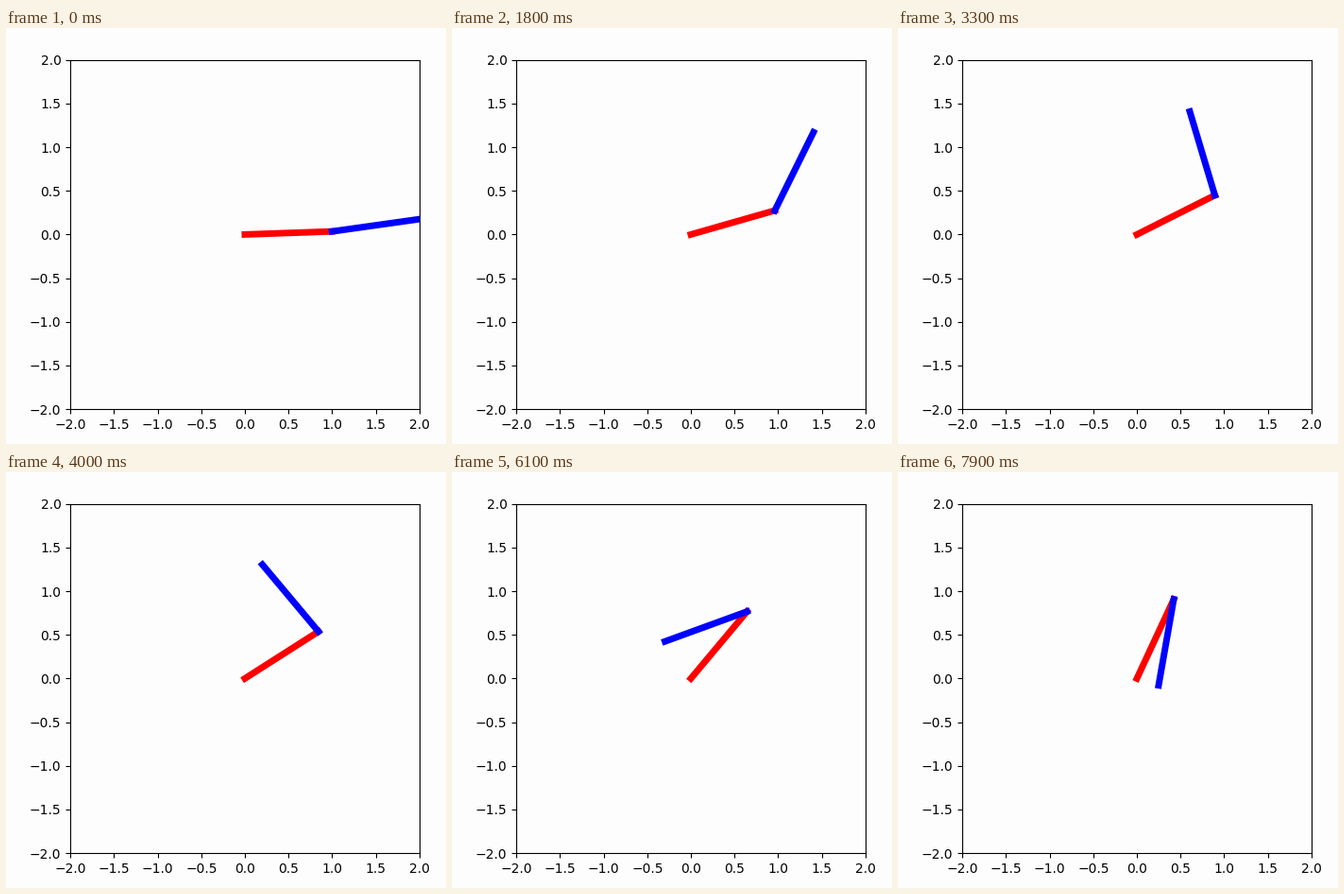
These frames come from a looping animation (466 px wide and 440 px high, 8000 ms). A matplotlib script:

```python
import matplotlib.pyplot as plt
import numpy as np
from matplotlib.animation import FuncAnimation

WIDTH, HEIGHT, DPI = 466, 440, 100
FRAMES, INTERVAL = 80, 100
SIDE = 369.6
PAPER = "#fdfdfd"

START = 8.0        # forearm heading at t = 0, degrees
SPEED = 10 / 3     # degrees per frame

fig = plt.figure(figsize=(WIDTH / DPI, HEIGHT / DPI), dpi=DPI, facecolor=PAPER)
ax = fig.add_axes([68.2 / WIDTH, 36.8 / HEIGHT, SIDE / WIDTH, SIDE / HEIGHT],
                  facecolor=PAPER)
ax.set(xlim=(-2, 2), ylim=(-2, 2))
ticks = np.arange(-2, 2.1, 0.5)
ax.set_xticks(ticks)
ax.set_yticks(ticks)

upper, = ax.plot([], [], color="red", lw=5)
fore, = ax.plot([], [], color="blue", lw=5)


def heading(i):
    """Forearm direction; the motion lags for a while early on."""
    lag = np.interp(i, [9, 18, 27], [0, 1.3, 3.4])
    return np.radians(START + SPEED * (i - lag))


def update(i):
    angle = heading(i)
    # The upper arm turns at a quarter of the forearm's rate.
    elbow = np.array([np.cos(angle / 4), np.sin(angle / 4)])
    hand = elbow + [np.cos(angle), np.sin(angle)]
    upper.set_data([0, elbow[0]], [0, elbow[1]])
    fore.set_data([elbow[0], hand[0]], [elbow[1], hand[1]])
    return upper, fore


anim = FuncAnimation(fig, update, frames=FRAMES, interval=INTERVAL,
                     repeat=True, repeat_delay=0)
plt.show()
```
